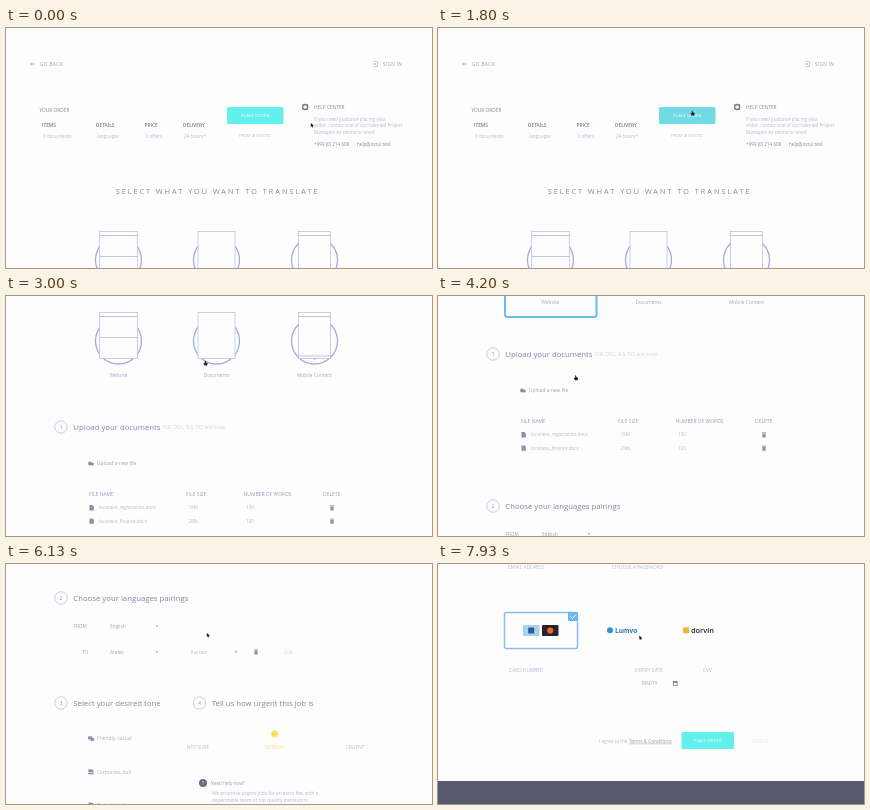
An HTML page for the animation above (8000 ms loop, 426 by 240 pixels).

```html
<!DOCTYPE html>
<html lang="en">
<head>
<meta charset="utf-8">
<title>Translation order</title>
<style>
  html, body { margin: 0; width: 100%; height: 100%; overflow: hidden; background: #fdfdfd; }
  svg { display: block; width: 100%; height: 100%; }
  text { font-family: "Open Sans", "Noto Sans", sans-serif; }
</style>
</head>
<body>
<svg id="stage" viewBox="0 0 426 240">
  <rect width="426" height="240" fill="#fdfdfd"/>
  <g id="page"></g>
  <g id="cursor">
    <path id="arrow" d="M-1.2-2 L1.9 .7 L.5 .9 L1.1 2.2 L.3 2.5 L-.3 1.2 L-1.2 1.9Z" fill="#15151b"/>
    <path id="hand" d="M-.8-2.6 Q-.2-3.1 .2-2.4 V-1.1 L1.6-.7 Q2.2-.4 2 .5 L1.5 2.1 H-.8 L-2.1 .2 Q-1.8-.7 -.8 0Z" fill="#15151b"/>
  </g>
</svg>
<script>
const LOOP = 8000, FPS = 15;
const END = 745; // scroll offset of the page bottom
const INK = '#8789a2', SOFT = '#b6b8d6', PALE = '#d0d2e6', LINE = '#a6acda', ICON = '#8c8fae',
      CYAN = '#63efeb', HOVER = '#70dbe5', BLUE = '#6db6f0', SUN = '#ffd950';

const $ = id => document.getElementById(id);
const page = $('page');

function add(tag, attrs, label) {
  const el = document.createElementNS('http://www.w3.org/2000/svg', tag);
  for (const k in attrs) el.setAttribute(k, attrs[k]);
  if (label) el.textContent = label;
  page.appendChild(el);
  return el;
}
const text = (x, y, label, fill = INK, size = 4.7, more = {}) =>
  add('text', { x, y: y + size * 0.36, fill, 'font-size': size, ...more }, label);
const mid = (x, y, label, fill, size, more) =>
  text(x, y, label, fill, size, { 'text-anchor': 'middle', ...more });
const box = (x, y, width, height, fill, more = {}) =>
  add('rect', { x, y, width, height, fill, ...more });
const disc = (cx, cy, r, fill, more = {}) => add('circle', { cx, cy, r, fill, ...more });
const line = (d, stroke = LINE, width = 0.7) =>
  add('path', { d, stroke, fill: 'none', 'stroke-width': width });
const outline = (stroke, width) => ({ stroke, 'stroke-width': width });

function section(n, x, y, label) {
  disc(x, y, 6.2, '#fdfdfd', outline('#b5b9d8', 0.7));
  mid(x, y, n, INK, 4.5);
  text(x + 12.3, y, label, '#8385a8', 7.75);
}
function trash(x, y) {
  box(x - 1.6, y - 1.4, 3.2, 4, ICON, { rx: 0.5 });
  line(`M${x - 2.1} ${y - 2.1}h4.2`, ICON, 0.8);
}
function bubbles(x, y) {
  box(x - 3, y - 2.3, 4.3, 3.2, ICON, { rx: 1 });
  box(x - 0.5, y - 0.4, 3.7, 2.9, ICON, { rx: 1 });
}
function people(x, y) {
  disc(x - 1.2, y - 1.1, 1.6, ICON);
  disc(x + 1.2, y - 0.8, 1.4, ICON);
  box(x - 3, y + 0.9, 6, 1.6, ICON, { rx: 0.7 });
}
function button(x, y, w, h, label) {
  const face = box(x, y, w, h, CYAN, { rx: 1.5 });
  mid(x + w / 2, y + h / 2, label, '#fff', 4.3);
  return face;
}
function caret(x, y) {
  add('path', { d: `M${x - 1.5} ${y - 0.8}h3l-1.5 1.8z`, fill: '#9fa2bd' });
}

// Header and order summary
line('M29.5 36H24.5m2-2l-2 2l2 2', '#9a9db5');
text(34, 36, 'GO BACK', '#9597ab', 4.7, { 'letter-spacing': 0.4 });
line('M368 33.5h3.5v5H368m-1.5-2.5h3.5m-1.2-1.2l1.2 1.2l-1.2 1.2', '#a3a6bb', 0.6);
text(377, 36, 'SIGN IN', '#9597ab', 4.7, { 'letter-spacing': 0.3 });

text(33.5, 82, 'YOUR ORDER', INK, 4.8);
[[36, 'ITEMS', '0 documents'], [90, 'DETAILS', 'languages'],
 [138.5, 'PRICE', '0 offers'], [177, 'DELIVERY', '24 hours*']].forEach(([x, head, value]) => {
  text(x, 97, head, '#787b90', 4.8, { 'font-weight': 600 });
  text(x + 1, 108, value, SOFT, 4.7);
});
const order = button(221, 79, 56.5, 17, 'PLACE ORDER');
mid(249, 107, 'PRINT A QUOTE', SOFT, 4.3);

disc(299.2, 79, 2.5, 'none', outline('#777b90', 1.3));
line('M296.3 76.1l1.8 1.8m2.2 2.2l1.8 1.8m0-5.8l-1.8 1.8m-2.2 2.2l-1.8 1.8', '#777b90', 0.9);
text(308, 79, 'HELP CENTER', INK, 4.8);
['If you need guidance placing your', 'order, contact one of our talented Project',
 'Managers by phone or email'].forEach((s, i) => text(308, 91.5 + i * 6.3, s, SOFT, 4.6));
text(308, 116, '+999 (0) 214 608', INK, 4.6);
text(351, 116, 'help@ovrul.test', INK, 4.6);

// What to translate
mid(211.5, 163, 'SELECT WHAT YOU WANT TO TRANSLATE', '#85879a', 7.2, { 'letter-spacing': 2.05 });
const kinds = [[112.5, 'Website', 19], [210.5, 'Documents', 18.5], [308.5, 'Mobile Content', 16]];
const chosen = box(67, 190, 91.5, 91, 'none', { rx: 2.5, ...outline('#6cbcf0', 2) });
kinds.forEach(([x, label, half]) => {
  disc(x, 232, 23, '#fdfdfd', outline(LINE, 1.3));
  box(x - half, 203.5, half * 2, 46, '#fdfdfd', outline('#b5badf', 0.7));
  mid(x, 266, label, '#a6a8c6', 4.9);
});
line('M93.5 207.5h38M93.5 228.5h38');
line('M292.5 207.5h32M292.5 247h32');
disc(308.5, 250, 1, 'none', outline(LINE, 0.6));

// Upload
section(1, 55, 318, 'Upload your documents');
text(157, 318.5, 'PDF, DOC, XLS, TXT and more', PALE, 4.6);
disc(84, 354.5, 1.9, ICON);
disc(86.3, 355, 1.5, ICON);
text(91, 354, 'Upload a new file', '#9fa1c2', 4.9);
[[83, 'FILE NAME'], [180, 'FILE SIZE'], [237.5, 'NUMBER OF WORDS'], [317, 'DELETE']]
  .forEach(([x, s]) => text(x, 385.5, s, '#9c9ebb', 5));
[[398.8, 'business_registration.docx', '1Mb', '150'], [412.2, 'business_finance.docx', '2Mb', '120']]
  .forEach(([y, name, size, words]) => {
    add('path', { d: `M83.5 ${y - 2.7}h3l1.3 1.3v4h-4.3z`, fill: ICON });
    text(93, y, name, SOFT, 4.6);
    text(182.5, y, size, SOFT, 4.6);
    text(240, y, words, SOFT, 4.6);
    trash(326, y);
  });

// Languages
section(2, 55, 470, 'Choose your languages pairings');
text(67.5, 498, 'FROM', '#a0a2be');
text(104, 498, 'English', '#a0a2c6');
text(76, 524, 'TO', '#a0a2be');
text(104, 524, 'Arabic', '#a0a2c6');
text(184.5, 524, 'Russian', SOFT);
caret(151, 498);
caret(151, 524);
caret(230, 524);
trash(250, 524);
text(278, 524, 'Add', PALE);

// Tone and urgency
section(3, 55, 575, 'Select your desired tone');
section(4, 193.5, 575, 'Tell us how urgent this job is');
[[610.5, 'Friendly, casual', bubbles], [643.8, 'Corporate, dull', people],
 [677, 'Technical, clear', people]].forEach(([y, s, icon]) => {
  icon(85, y);
  text(91, y, s, '#abadca', 4.9);
});
for (let i = 0; i < 8; i++) {
  const a = i * Math.PI / 4;
  disc(268.5 + 3.1 * Math.cos(a), 606 + 3.1 * Math.sin(a), 0.85, SUN);
}
disc(268.5, 606, 2.6, SUN);
mid(192, 619.5, 'NOT SURE', SOFT, 4.6);
mid(268.5, 619.5, 'NORMAL', '#f7dd84', 4.8);
mid(349, 619.5, 'URGENT', SOFT, 4.8);
disc(197, 655, 4, '#686c7e');
mid(197, 655, '?', '#fff', 5);
text(204.5, 655, 'Need help now?', '#9c9ebb', 4.6);
text(206, 665.5, 'We prioritise urgent jobs for an extra fee, with a', SOFT, 4.8);
text(206, 671.8, 'dependable team of top quality translators', SOFT, 4.8);

// Account and payment
section(5, 55, END - 27, 'Create your account');
text(70, END + 3.5, 'EMAIL ADDRESS', SOFT, 4.9);
text(174, END + 3.5, 'CHOOSE A PASSWORD', SOFT, 4.9);

box(66.5, END + 48.5, 73, 36, '#fdfdfd', { rx: 2, ...outline('#8dbdf0', 1.5) });
box(130, END + 48, 10, 9, BLUE, { rx: 1 });
line(`M132.5 ${END + 52.5}l2 2l3.5-4`, '#fff', 0.9);
box(85, END + 61, 16.5, 11, '#a9d3e8', { rx: 1 });
box(90.2, END + 63.5, 6, 6, '#31599c');
box(104, END + 61, 16.5, 11, '#25262d', { rx: 1 });
disc(112.2, END + 66.5, 3.1, '#ee6530');
disc(172, END + 66.3, 3, '#2b93cf');
text(177, END + 66.3, 'Lumvo', '#2b74b5', 6.6, { 'font-weight': 700 });
box(245, END + 63.3, 6, 6, '#f5b437');
text(253, END + 66.3, 'dorvin', '#26262c', 7.4, { 'font-weight': 600 });

text(71, END + 106, 'CARD NUMBER', SOFT, 4.8);
text(197, END + 106, 'EXPIRY DATE', SOFT, 4.8);
text(265, END + 106, 'CVV', SOFT, 4.8);
text(204, END + 119, 'MM/YY', '#a5a9c4', 4.7);
box(235.5, END + 117.5, 3.6, 3.8, '#fdfdfd', outline('#65687a', 0.7));
line(`M235.5 ${END + 118.2}h3.6`, '#65687a', 1);
text(161, END + 177, 'I agree to the', SOFT, 4.6);
text(191, END + 177, 'Terms & Conditions', '#9699ac', 4.7, { 'text-decoration': 'underline' });
button(243.5, END + 168, 52.5, 17, 'PLACE ORDER');
text(314, END + 177, 'CANCEL', '#e0e1e9', 4.6);
box(0, END + 217, 426, 24, '#575a6c');

// Keyed motion: [time, ...values], eased between keys
const scrollKeys = [[1950, 0], [2800, 187], [3600, 187], [4120, 260], [4270, 260],
                    [4900, 411.5], [5200, 411.5], [5800, 436], [6250, 436], [7500, END]];
const cursorKeys = [[500, 306, 97], [1500, 254.5, 85.5], [2000, 254.5, 85.5], [2800, 199.5, 67.5],
                    [3020, 199.5, 67.5], [3400, 113, 52], [3620, 113, 52], [4120, 138, 82],
                    [4930, 136.7, 85.5], [5150, 136.7, 85.5], [5750, 202, 71],
                    [6300, 202, 71], [7500, 202.5, 73.5]];

function at(keys, t) {
  const i = keys.findIndex(k => k[0] > t);
  if (i === 0) return keys[0].slice(1);
  if (i < 0) return keys[keys.length - 1].slice(1);
  const a = keys[i - 1], b = keys[i];
  const u = (t - a[0]) / (b[0] - a[0]), e = u * u * (3 - 2 * u);
  return a.slice(1).map((v, j) => v + (b[j + 1] - v) * e);
}

function draw(t) {
  const [scroll] = at(scrollKeys, t);
  const [x, y] = at(cursorKeys, t);
  const py = y + scroll;
  const over = x > 221 && x < 277.5 && py > 79 && py < 96;
  const hand = over || (t > 2000 && t < 4300);
  page.setAttribute('transform', `translate(0 ${-scroll})`);
  $('cursor').setAttribute('transform', `translate(${x} ${y})`);
  $('hand').setAttribute('visibility', hand ? 'visible' : 'hidden');
  $('arrow').setAttribute('visibility', hand ? 'hidden' : 'visible');
  order.setAttribute('fill', over ? HOVER : CYAN);
  chosen.setAttribute('visibility', t >= 3500 ? 'visible' : 'hidden');
}

const start = performance.now();
function tick() {
  const t = (performance.now() - start) % LOOP;
  draw(Math.floor(t * FPS / 1000 + 0.01) * 1000 / FPS);
  requestAnimationFrame(tick);
}
tick();
</script>
</body>
</html>
```
